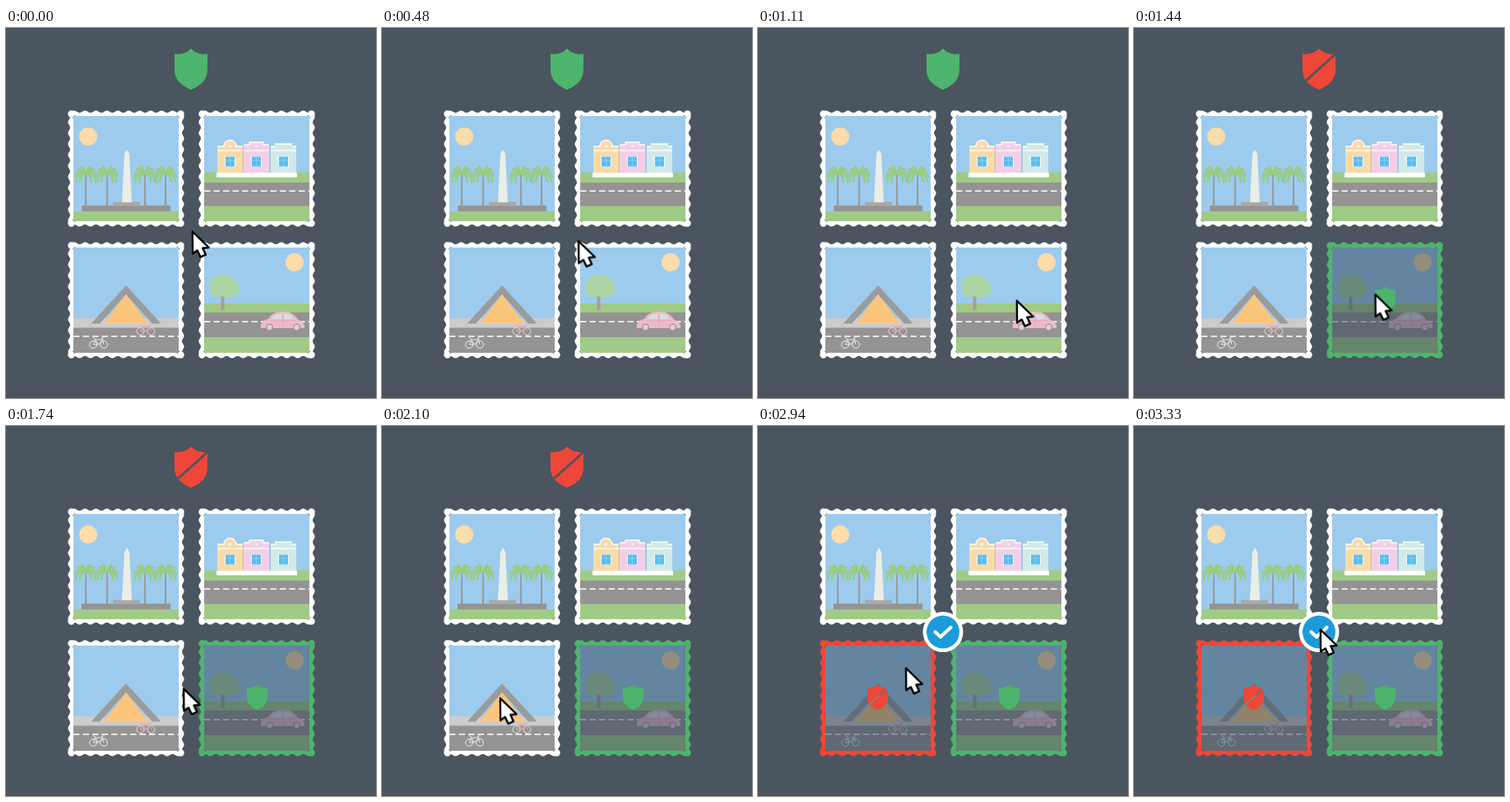
These frames come from a looping animation (450 px wide and 450 px high, 3630 ms). An HTML page:

```html
<!DOCTYPE html>
<html lang="en">
<head>
<meta charset="utf-8">
<title>Stamps</title>
<style>
  html, body { margin: 0; width: 100%; height: 100%; overflow: hidden; background: #4b555f; }
  svg { display: block; width: 100vw; height: 100vh; }
  :root { --sky: #9dcbee; --grass: #a0cb86; --road: #959394; --sun: #fcdcaa; --ok: #4db46d; --no: #ee4738; }

  .sky { fill: var(--sky); }
  .grass { fill: var(--grass); }
  .road { fill: var(--road); }
  .sun { fill: var(--sun); }
  .lane { stroke: #fff; stroke-width: 1.4; stroke-dasharray: 7.5 4; }
  .edge { fill: #fff; }
  .veil { fill: #2d4054; fill-opacity: .5; }
  .frond { fill: none; stroke: #98cb7b; stroke-width: 2.3; stroke-linecap: round; }
  .trim { fill: none; stroke: #fff; stroke-width: 1.3; }
  .bike { fill: none; stroke-width: 1; }

  /* every hard switch shares the same clock */
  .cut { animation: 3630ms step-end infinite; }
  .veil, .late, .badge { visibility: hidden; }
  .right .veil, .right .late { animation-name: show-right; }
  .left .veil, .left .late, .badge { animation-name: show-left; }
  .right .edge { animation-name: edge-right; }
  .left .edge { animation-name: edge-left; }
  .ask-ok { animation-name: ask-ok; }
  .ask-no { visibility: hidden; animation-name: ask-no; }

  @keyframes show-right { 0% { visibility: hidden } 32.23%, 100% { visibility: visible } }
  @keyframes show-left { 0% { visibility: hidden } 59.5%, 100% { visibility: visible } }
  @keyframes edge-right { 0% { fill: #fff } 32.23%, 100% { fill: var(--ok) } }
  @keyframes edge-left { 0% { fill: #fff } 59.5%, 100% { fill: var(--no) } }
  @keyframes ask-ok { 0% { visibility: visible } 33.05%, 100% { visibility: hidden } }
  @keyframes ask-no { 0% { visibility: hidden } 33.05% { visibility: visible } 60.33%, 100% { visibility: hidden } }

  .cursor { animation: roam 3630ms linear infinite; }
  @keyframes roam {
    0% { transform: translate(0, 0) }
    6.61% { transform: translate(0, 0); animation-timing-function: cubic-bezier(.33, 0, .67, .33) }
    14.88% { transform: translate(19px, 18px) }
    21.49% { transform: translate(50px, 44px) }
    29.75% { transform: translate(87px, 83px) }
    31.4% { transform: translate(89px, 85px) }
    35.54% { transform: translate(89px, 85px); animation-timing-function: cubic-bezier(.33, 0, .67, .33) }
    39.67% { transform: translate(67px, 76.5px) }
    44.63% { transform: translate(18px, 70px) }
    51.24% { transform: translate(-39px, 74px); animation-timing-function: cubic-bezier(.33, .42, .67, .9) }
    57.85% { transform: translate(-83px, 83.5px) }
    64.45% { transform: translate(-83px, 83.5px) }
    64.46% { transform: translate(-86px, 84px) }
    69.42% { transform: translate(-86px, 84px); animation-timing-function: cubic-bezier(.33, 0, .67, .33) }
    73.55% { transform: translate(-79px, 79px) }
    80.99% { transform: translate(-47px, 47px) }
    84.3% { transform: translate(-32px, 32px) }
    91.74%, 100% { transform: translate(0, 0) }
  }
</style>
</head>
<body>
<svg viewBox="0 0 450 450">
  <defs>
    <g id="side">
      <path id="wave"/>
      <circle cx="-2.500" cy="-2.500" r="4.200"/>
    </g>
    <g id="edge">
      <use href="#side"/>
      <use href="#side" transform="rotate(90 64 64)"/>
      <use href="#side" transform="rotate(180 64 64)"/>
      <use href="#side" transform="rotate(270 64 64)"/>
    </g>
    <path id="shield" d="M0-25C-5-19.500-12-17.500-20-18.500V1C-20 13-12 20 0 25C12 20 20 13 20 1V-18.500C12-17.500 5-19.500 0-25Z"/>
    <mask id="slash" maskUnits="userSpaceOnUse" x="-30" y="-30" width="60" height="60">
      <rect x="-30" y="-30" width="60" height="60" fill="#fff"/>
      <path d="M-22 19.500L23-21" stroke="#000" stroke-width="2.800"/>
    </mask>
    <g id="denied"><use href="#shield" mask="url(#slash)" fill="#ee4738"/></g>
    <g id="palm">
      <path d="M-.8 0H.8L1.200 39H-1.200Z" fill="#9b9b98"/>
      <g id="fan" class="frond">
        <path d="M0 0Q-4-8-10-5M0 0Q-9-7-13 3M0 0Q-10-4-12 10M0 0Q-7 0-7 10M0 0Q-3-8-5-8"/>
      </g>
      <use href="#fan" transform="scale(-1 1)"/>
    </g>
    <g id="wheels" class="bike">
      <circle cx="-6.500" cy="2" r="4.400"/>
      <circle cx="6.500" cy="2" r="4.400"/>
    </g>
    <path id="frame" class="bike" d="M-6.500 2L-4-4H5L0 2H-6.500M0 2L-5-6H-7M6.500 2L4-6H7"/>
    <g id="front">
      <path d="M0 8H31" class="trim"/>
      <rect x="9" y="15" width="13" height="13" fill="#fff" fill-opacity=".8"/>
      <rect x="10" y="15.500" width="11" height="12" fill="#5abdef"/>
      <path d="M15.500 15.500V27.500M10 20H21" stroke="#8ed3f6" stroke-width=".8"/>
      <rect x="-1" y="35" width="33" height="5.500" fill="#fff"/>
    </g>
  </defs>

  <rect width="450" height="450" fill="#4b555f"/>

  <g transform="translate(225 50)">
    <use class="cut ask-ok" href="#shield" fill="#4db46d"/>
    <g class="cut ask-no"><use href="#denied"/></g>
  </g>

  <!-- obelisk -->
  <g transform="translate(82 107)">
    <use class="edge" href="#edge"/>
    <rect class="sky" width="128" height="128"/>
    <circle class="sun" cx="18" cy="25" r="11"/>
    <rect class="grass" y="116" width="128" height="12"/>
    <use href="#palm" x="15" y="70"/>
    <use href="#palm" x="41" y="70"/>
    <use href="#palm" x="87" y="70"/>
    <use href="#palm" x="112" y="70"/>
    <rect x="10" y="109" width="108" height="7" fill="#949494"/>
    <rect x="48" y="104.500" width="33" height="5" fill="#a9a9a6"/>
    <path d="M65 41L68 46L71 105H59L62 46Z" fill="#ebeee4"/>
  </g>

  <!-- houses -->
  <g transform="translate(241 107)">
    <use class="edge" href="#edge"/>
    <rect class="sky" width="128" height="128"/>
    <rect class="grass" y="68.500" width="128" height="59.500"/>
    <rect class="road" y="81" width="128" height="28.500"/>
    <path class="lane" d="M0 91.300H128"/>
    <g transform="translate(16 34)">
      <path d="M0 3H8A7.500 7.500 0 0 1 23 3H31V40H0Z" fill="#fbdaa6"/>
      <path class="trim" d="M0 3H8A7.500 7.500 0 0 1 23 3H31"/>
      <circle cx="15.500" cy="2.500" r="1.600" fill="#fff"/>
      <use href="#front"/>
    </g>
    <g transform="translate(48 34)">
      <path d="M0 1H7V-2H24V1H31V40H0Z" fill="#f3cfe6"/>
      <path class="trim" d="M0 1H7V-2H24V1H31"/>
      <circle cx="15.500" cy="3" r="1.300" fill="#fff"/>
      <use href="#front"/>
    </g>
    <g transform="translate(81 34)">
      <path d="M0 3H5V0H26V3H31V40H0Z" fill="#d2eae6"/>
      <path class="trim" d="M0 3H5M5 0H26M26 3H31"/>
      <use href="#front"/>
    </g>
  </g>

  <!-- pyramid -->
  <g class="left" transform="translate(82 267)">
    <use class="edge cut" href="#edge"/>
    <rect class="sky" width="128" height="128"/>
    <rect y="86" width="128" height="12" fill="#cbcccd"/>
    <rect class="road" y="97.500" width="128" height="30.500"/>
    <path d="M64 46L106.500 92.500H96L64 57L32 92.500H21.500Z" fill="#9c9b9b"/>
    <path d="M64 57L91 92.500H37Z" fill="#fcc57c"/>
    <path class="lane" d="M0 108H128"/>
    <g transform="translate(88 100)">
      <use href="#wheels" stroke="#f0dcdf"/>
      <use href="#frame" stroke="#eba5b2"/>
    </g>
    <g transform="translate(30.500 116)">
      <use href="#wheels" stroke="#eef2f2"/>
      <use href="#frame" stroke="#d9ebe8"/>
    </g>
    <rect class="veil cut" width="128" height="128"/>
    <g class="late cut"><use href="#denied" transform="translate(63.500 63) scale(.62)"/></g>
  </g>

  <!-- car -->
  <g class="right" transform="translate(241 267)">
    <use class="edge cut" href="#edge"/>
    <rect class="sky" width="128" height="128"/>
    <circle class="sun" cx="110" cy="18" r="11"/>
    <rect class="grass" y="68" width="128" height="60"/>
    <rect class="road" y="79" width="128" height="30"/>
    <path class="lane" d="M0 90.300H128"/>
    <path d="M21 50H24L25 76H20Z" fill="#a49f96"/>
    <path d="M23 59L32 49" stroke="#a49f96" stroke-width="1.500"/>
    <path d="M12 37C14 31 31 32 34 37C41 41 45 49 42 54C40 61 28 63 21 59C12 62 5 57 7 50C5 44 8 39 12 37Z" fill="#a9d3a2"/>
    <path d="M69 98C68 91 72 88 78 87C82 80 89 78 96 78C105 78 111 82 114 88C119 89 123 93 122 98Z" fill="#f1bacb"/>
    <path d="M82 87C85 82 89 81 94 81V87ZM97 81C103 81 107 83 109 87H97Z" fill="#d3dfe9"/>
    <path d="M80 89H111M96 82V97" fill="none" stroke="#dfa0b7" stroke-width=".7"/>
    <g fill="#d9d3d6" stroke="#a3929c" stroke-width="1.300">
      <circle cx="79.500" cy="97" r="3.800"/>
      <circle cx="112.500" cy="97" r="3.800"/>
    </g>
    <rect class="veil cut" width="128" height="128"/>
    <use class="late cut" href="#shield" transform="translate(64.500 63) scale(.62)" fill="#4db46d"/>
  </g>

  <g class="badge cut">
    <circle cx="225" cy="250.500" r="24.500" fill="#fff"/>
    <circle cx="225" cy="250.500" r="20" fill="#1c9ad9"/>
    <path d="M215.500 250.500L222 256.500L234.500 245" fill="none" stroke="#fff" stroke-width="4.200" stroke-linecap="round" stroke-linejoin="round"/>
  </g>

  <g class="cursor">
    <path d="M226.800 247.600L227.100 274.500L232.600 270.400L236.600 278.600L243 275.700L239.300 267.700L246.700 267Z" fill="#fff" stroke="#000" stroke-width="2.400" stroke-linejoin="round"/>
  </g>
</svg>
<script>
  // one wavy side of the stamp border, filled down to the middle
  const waves = 10, span = 133, half = span / waves / 2;
  const ripple = `t${half} 0`.repeat(waves * 2 - 1);
  document.getElementById('wave').setAttribute('d',
    `M-2.5 -5.3q${half / 2} -2.6 ${half} 0${ripple}L64 64Z`);
</script>
</body>
</html>
```
